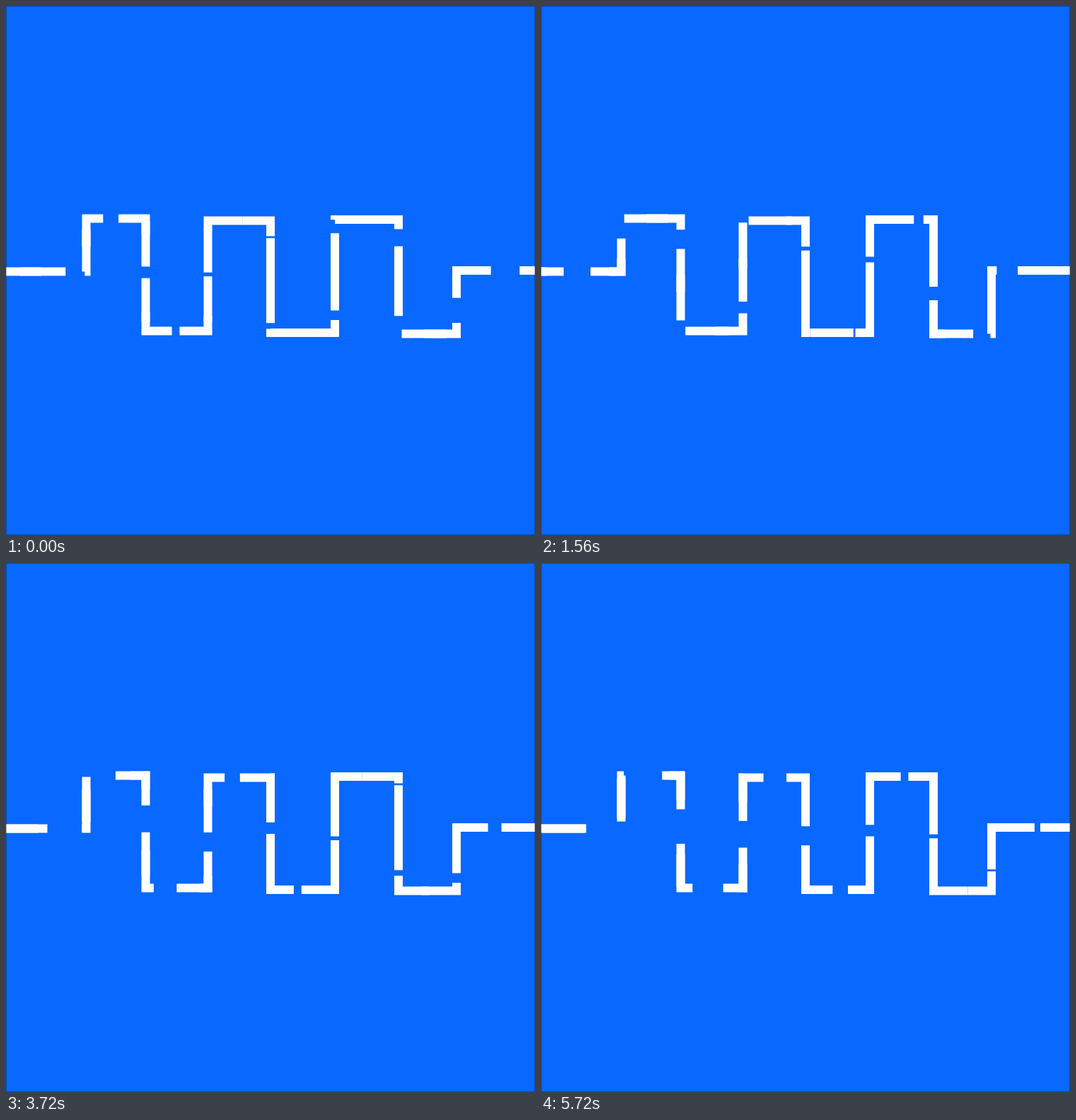
Recreate the animation shown at these times as an HTML page. Size 748 by 748 pixels, loop 5760 ms.

```html
<!DOCTYPE html>
<html lang="en">
<head>
<meta charset="utf-8">
<title>Square wave</title>
<style>
  html, body { margin: 0; width: 100%; height: 100%; overflow: hidden; background: #0868ff; }
  svg { display: block; width: 100vw; height: 100vh; }
  path { fill: none; stroke: #fff; stroke-width: 12; stroke-linejoin: miter; }
</style>
</head>
<body>
<svg viewBox="0 0 748 748">
  <rect width="748" height="748" fill="#0868ff"/>
  <g id="wave"></g>
  <rect x=".25" y=".25" width="747.5" height="747.5" fill="none" stroke="#000" stroke-opacity=".55" stroke-width=".5"/>
</svg>
<script>
  const LOOP = 5760, STEP = 40, SPEED = 5.2343, LEAD = 300;
  const WAVE = `M${-LEAD} 375.5H113.5V300.5H197.5V459.5H285.5V303.5H374V462H465V302H555V463.5H637V374H1000`;

  // Two dash patterns of slightly different period overlap and beat against each other.
  const layers = [
    { dash: 64.13, gap: 64, start: 148.2 },
    { dash: 61.22, gap: 61.5, start: 111.3 }
  ];

  const group = document.getElementById('wave');
  for (const layer of layers) {
    layer.path = document.createElementNS('http://www.w3.org/2000/svg', 'path');
    layer.path.setAttribute('d', WAVE);
    layer.path.setAttribute('stroke-dasharray', `${layer.dash} ${layer.gap}`);
    group.append(layer.path);
  }

  function draw(time) {
    const travel = Math.floor((time % LOOP) / STEP) * SPEED;
    for (const { path, dash, gap, start } of layers) {
      const period = dash + gap;
      const shift = (LEAD + start + travel) % period;
      path.setAttribute('stroke-dashoffset', period - shift);
    }
  }

  const begin = performance.now();
  function tick() {
    draw(performance.now() - begin);
    requestAnimationFrame(tick);
  }
  draw(0);
  requestAnimationFrame(tick);
</script>
</body>
</html>
```
